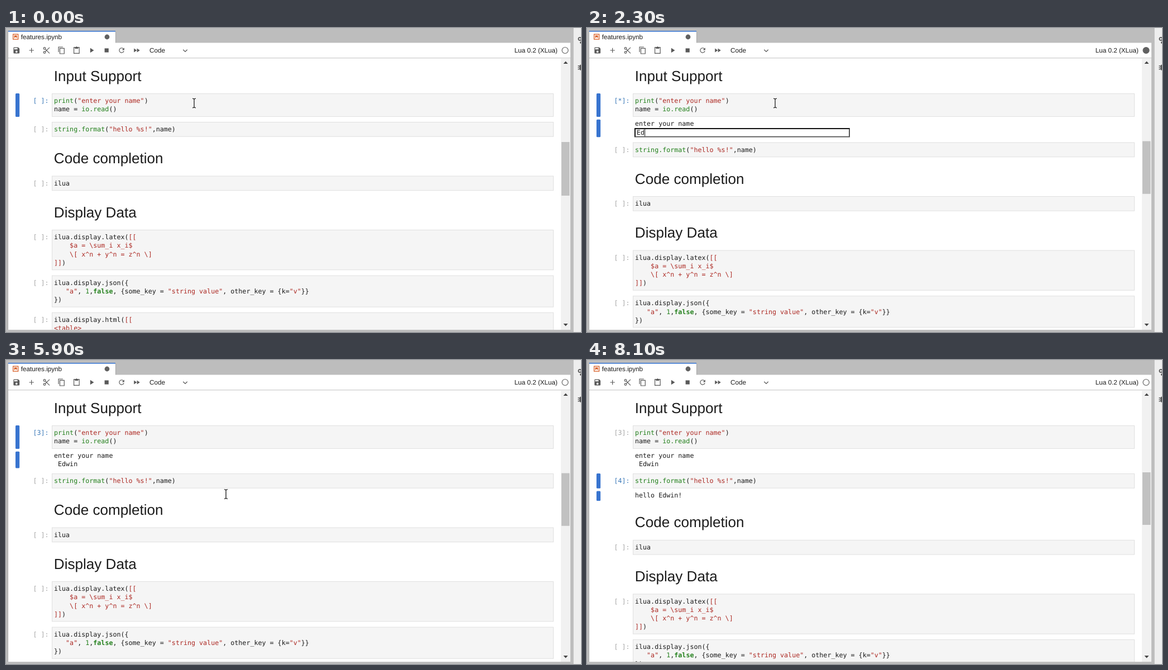
Animation of 1030 by 544 pixels, one loop 8900 ms. Source, as an HTML page:

```html
<!DOCTYPE html>
<html lang="en">
<head>
<meta charset="utf-8">
<title>Notebook input demo</title>
<style>
html, body { margin: 0; width: 100%; height: 100%; overflow: hidden; background: #bdbdbd; }
svg { display: block; }
text { white-space: pre; text-rendering: geometricPrecision; fill: #1c1c1c; }
.ui { font: 11.7px "Liberation Sans", Arial, sans-serif; }
.h { font: 26.1px "Liberation Sans", Arial, sans-serif; }
.code { font: 11.68px "DejaVu Sans Mono", monospace; }
.g { fill: #23801c; }
.s { fill: #ad2a24; }
.k { fill: #23801c; font-weight: bold; }
.box { fill: #f5f5f5; stroke: #e0e0e0; }
.prompt { fill: #a6a6a6; }
.active .prompt { fill: #3a78b8; }
.edit .box { fill: #fff; stroke: #5b8fd3; }
.edit .m { fill: #2fae2f; }
.bar { fill: #3874cf; }
.icons { fill: #595959; }
.line { fill: none; stroke: #595959; stroke-width: 2; }
.hide { display: none; }
</style>
</head>
<body>
<svg width="1030" height="544" viewBox="0 0 1030 544">
  <defs>
    <clipPath id="view"><rect x="4" y="54" width="990" height="486"/></clipPath>
  </defs>

  <!-- window frame -->
  <rect width="1030" height="544" fill="#bdbdbd"/>
  <path d="M3.5 5V540M196.5 6V27" stroke="#a6a6a6"/>
  <rect x="4" y="26.5" width="1007" height="513.5" fill="#fff"/>
  <rect x="4" y="5" width="192" height="23" fill="#fff"/>
  <rect x="4" y="5" width="192" height="1.6" fill="#3874cf"/>
  <rect x="4" y="53" width="1007" height="1" fill="#cfcfcf"/>
  <rect x="4" y="54" width="990" height="1" fill="#f0f0f0"/>
  <rect x="1016" width="14" height="544" fill="#eee"/>
  <path d="M1016.5 0V544" stroke="#cacaca"/>
  <g fill="#595959">
    <circle cx="1028" cy="19.5" r="2.6" fill="none" stroke="#595959" stroke-width="1.8"/>
    <circle cx="1030" cy="26" r="2"/>
    <path d="M1030 65.500Q1026.500 66 1026.500 70.500T1030 76zM1024.500 67h3v1.500h-3zM1024.500 70h3v1.500h-3zM1024.500 73h3v1.500h-3z"/>
  </g>

  <!-- tab -->
  <rect x="12.700" y="11.200" width="9" height="9" fill="#fff" stroke="#d9622b" stroke-width="1.300"/>
  <path d="M14.700 13.200h5v5l-2.500-2.200l-2.500 2.200z" fill="#d9622b"/>
  <text class="ui" x="26.700" y="20">features.ipynb</text>
  <circle cx="181" cy="16" r="4.400" fill="#616161"/>

  <!-- toolbar -->
  <g class="icons" id="icons"></g>
  <text class="ui" x="257" y="44">Code</text>
  <path d="M317.300 38.700l3.700 3.700l3.700-3.700" class="line" style="stroke-width:1.300"/>
  <text class="ui" x="910.700" y="44">Lua 0.2 (XLua)</text>
  <circle id="kernel" cx="1001.500" cy="40" r="5.500" stroke="#616161" stroke-width="1.200"/>

  <!-- scrollbar -->
  <rect x="994" y="54" width="17" height="486" fill="#f1f1f1"/>
  <rect id="thumb" x="995" width="14.500" fill="#c1c1c1"/>
  <path d="M998.500 64l4-4.500l4 4.500zM998.500 529l4 4.500l4-4.500z" fill="#454545"/>

  <g clip-path="url(#view)">
    <rect class="bar" id="cellBar" x="17" width="7.200" rx="1.500"/>
    <rect class="bar" id="outBar" x="17" width="7.200" rx="1.500"/>
    <g id="first"></g>
    <g id="output">
      <text class="code" x="86" y="175">enter your name</text>
      <text class="code" x="86" y="190.200" id="echo"></text>
    </g>
    <g id="field">
      <rect x="85" y="179" width="386" height="16.500" fill="#555"/>
      <path d="M85 179H471L469 181H87V193.500L85 195.500z" fill="#111"/>
      <rect x="87" y="181" width="382" height="12.700" fill="#fff"/>
      <text class="code" x="89.100" y="191" id="typed"></text>
      <rect id="fieldCaret" y="181" width="1" height="12.700" fill="#111"/>
    </g>
    <g id="second"></g>
    <text class="code" x="86" y="246" id="greeting"></text>
    <g id="rest"></g>
    <rect id="caret" width="1" height="15" fill="#111"/>
  </g>

  <g id="beam" fill="none">
    <path d="M-3.500-8.500H3.500M0-8.500V8.500M-3.500 8.500H3.500" stroke="#fff" stroke-width="3"/>
    <path d="M-3-8.300Q-.5-8.300 0-7Q.5-8.300 3-8.300M0-7V7M-3 8.300Q-.5 8.300 0 7Q.5 8.300 3 8.300" stroke="#151515" stroke-width="1.300"/>
  </g>
  <path id="arrow" d="M66 27v14l3.200-3l2.200 5l2.200-1l-2.200-4.800h4.400z" fill="#111" stroke="#fff"/>
</svg>

<script>
const LOOP = 8900, NAME = 'Edwin', CHAR = 7.03, LINE = 15.2;
const $ = id => document.getElementById(id);
const span = cls => text => `<tspan class="${cls}">${text}</tspan>`;
const g = span('g'), s = span('s'), k = span('k'), m = span('m');

function cell(top, ...lines) {
  const rows = lines.map((line, i) =>
    `<text class="code" x="86" y="${top + 17.2 + i * LINE}">${line}</text>`).join('');
  return `<rect class="box" x="82.5" y="${top + .5}" width="898" height="${lines.length * LINE + 10.5}"/>
    <text class="code prompt" x="48.5" y="${top + 17.2}">[ ]:</text>${rows}`;
}
const heading = (y, text) => `<text class="h" x="85.8" y="${y}">${text}</text>`;

$('first').innerHTML = heading(94.5, 'Input Support') + cell(117,
  g('print') + m('(') + s('"enter your name"') + m(')'),
  'name = ' + g('io.read') + '()');
$('second').innerHTML = cell(168,
  g('string.format') + m('(') + s('"hello %s!"') + ',name' + m(')'));
$('rest').innerHTML =
  heading(242, 'Code completion') + cell(264.5, 'ilua') +
  heading(338.6, 'Display Data') +
  cell(361, 'ilua.display.latex(' + s('[['), s('    $a = \\sum_i x_i$'),
    s('    \\[ x^n + y^n = z^n \\]'), s(']]') + ')') +
  cell(442.6, 'ilua.display.json({',
    `   ${s('"a"')}, ${g('1')},${k('false')}, {some_key = ${s('"string value"')}, other_key = {k=${s('"v"')}}}`,
    '})') +
  cell(508.8, 'ilua.display.html(' + s('[['), s('&lt;table>'), s('  &lt;tr>'));
$('echo').textContent = ' ' + NAME;
$('greeting').textContent = `hello ${NAME}!`;

// Toolbar icons on a 24 unit grid, 27 px apart
const stroke = d => `<path class="line" d="${d}"/>`, fill = d => `<path fill-rule="evenodd" d="${d}"/>`;
$('icons').innerHTML = [
  fill('M5 3H17L21 7V19Q21 21 19 21H5Q3 21 3 19V5Q3 3 5 3zM5 5V9H15V5zM12 13a3 3 0 1 0 .01 0z'),
  stroke('M12 5V19M5 12H19'),
  '<circle class="line" cx="6" cy="6" r="3"/><circle class="line" cx="6" cy="18" r="3"/>' +
    stroke('M8 8L21 21M8 16L21 3.500'),
  stroke('M16 2H3V17M7 6H20V22H7z'),
  stroke('M8 3H4V21H20V3H16') + fill('M7 2H10Q12-1.500 14 2H17V7H7z'),
  fill('M8 5V19L19 12z'),
  fill('M6 6H18V18H6z'),
  stroke('M18.700 14A7 7 0 1 1 17 7') + fill('M13 11H20V4z'),
  fill('M4 18L12.500 12L4 6zM13 6V18L21.500 12z')
].map((icon, i) => `<g transform="translate(${11.6 + i * 26.9} 32.8) scale(.6)">${icon}</g>`).join('');

// Pointer position every 100 ms from MOVE on
const MOVE = 5300;
const path = [[335.5, 134], [333, 142], [335, 165], [343, 200], [358, 235],
  [378, 257], [394, 240], [400, 220], [401, 212]];

const show = (id, on) => $(id).classList.toggle('hide', !on);
const set = (id, attrs) => { for (const a in attrs) $(id).setAttribute(a, attrs[a]); };
const shift = (id, y) => set(id, { transform: `translate(0 ${y})` });

function draw(t) {
  const within = (from, to) => t >= from && t < to;
  const asked = t >= 1100, busy = within(1100, 4300), done = t >= 4300, greeted = t >= 7000;
  const edit1 = within(200, 1100), edit2 = within(6100, 7000);
  const onSecond = within(1100, 1200) || t >= 6100;
  const drop = busy ? 36.5 : done ? 35 : 0;

  $('first').setAttribute('class', (onSecond ? '' : 'active') + (edit1 ? ' edit' : ''));
  $('second').setAttribute('class', (onSecond ? 'active' : '') + (edit2 ? ' edit' : ''));
  $('first').querySelector('.prompt').textContent = busy ? '[*]:' : done ? '[3]:' : '[ ]:';
  $('second').querySelector('.prompt').textContent = greeted ? '[4]:' : '[ ]:';
  shift('second', drop);
  shift('rest', drop + (greeted ? 22.4 : 0));

  set('cellBar', onSecond ? { y: 168 + drop, height: 26.7 } : { y: 117, height: 41.9 });
  set('outBar', onSecond ? { y: 234.5, height: 17.5 } : { y: 163.8, height: busy ? 31.4 : 29.6 });
  show('outBar', onSecond ? greeted : asked);
  show('output', asked);
  show('echo', done);
  show('greeting', greeted);
  show('field', busy);
  set('kernel', { fill: busy ? '#616161' : '#fff' });
  set('thumb', greeted ? { y: 201, height: 94 } : asked ? { y: 202.5, height: 94.3 } : { y: 204, height: 96 });

  const count = t < 2100 ? 0 : t < 2300 ? 1 : t < 2800 ? 2 : NAME.length;
  $('typed').textContent = NAME.slice(0, count);
  set('fieldCaret', { x: 89.1 + count * CHAR });
  show('fieldCaret', !within(1700, 2100) && !within(3500, 4100));

  show('caret', within(200, 800) || within(6100, 6600));
  set('caret', edit2 ? { x: 86 + 31 * CHAR, y: 208.5 } : { x: 86 + 24 * CHAR, y: 123 });

  const step = Math.min(path.length - 1, Math.floor((t - MOVE) / 100));
  const [x, y] = step < 0 ? [337, 134.5] : path[step];
  set('beam', { transform: `translate(${x} ${y})` });
  show('beam', t < 8000);
  show('arrow', within(8000, 8100));
}

const start = performance.now();
function tick() {
  draw((performance.now() - start) % LOOP);
  requestAnimationFrame(tick);
}
tick();
</script>
</body>
</html>
```
